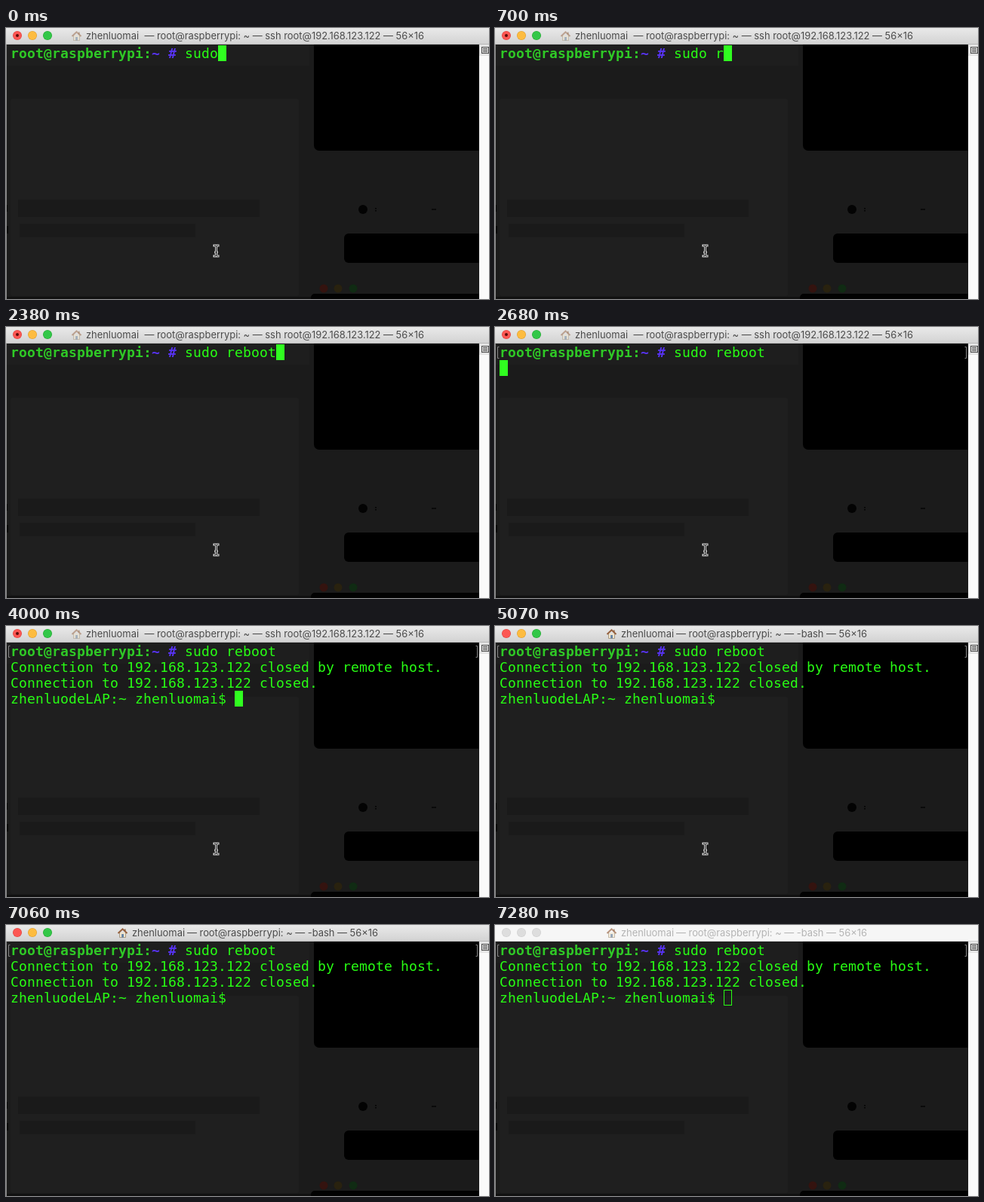
Write an HTML page with a canvas that moves like this. It is 640 by 360 pixels and loops after 7.32 s.

```html
<!DOCTYPE html>
<html lang="en">
<head>
<meta charset="utf-8">
<title>Terminal reboot</title>
<style>
html, body { margin: 0; width: 100%; height: 100%; overflow: hidden; background: #1c1c1c; }
canvas { display: block; width: 640px; height: 360px; }
</style>
</head>
<body>
<canvas id="stage"></canvas>
<script>
const LOOP = 7320, W = 640, H = 360;
const COL = 11, ROW = 21, LEFT = 6, TOP = 23;
const MONO = '18px "DejaVu Sans Mono", monospace';
const GREEN = '#28fe14', PROMPT = '#2fc926', BLUE = '#5833f4';
const USER = 'zhenluomai', HOST = 'zhenluodeLAP', IP = '192.168.123.122';

const ENTER = 2620, CLOSED = 4000, SHELL = 4060, LEAVE = 6480, INACTIVE = 7280;
const KEYS = [400, 700, 940, 1240, 1480, 1660, 2380];
const BLINKS = [5070, 5610, 6090, 6590, 7060];

const canvas = document.getElementById('stage');
const dpr = window.devicePixelRatio || 1;
canvas.width = W * dpr;
canvas.height = H * dpr;
const ctx = canvas.getContext('2d');
ctx.scale(dpr, dpr);

const countPast = (times, t) => times.filter(x => t >= x).length;

function rect(x, y, w, h, color) {
  ctx.fillStyle = color;
  ctx.fillRect(x, y, w, h);
}

function rounded(x, y, w, h, radii, color) {
  ctx.fillStyle = color;
  ctx.beginPath();
  ctx.roundRect(x, y, w, h, radii);
  ctx.fill();
}

function disc(x, y, r, color) {
  ctx.fillStyle = color;
  ctx.beginPath();
  ctx.arc(x, y, r, 0, Math.PI * 2);
  ctx.fill();
}

function line(color, width, ...points) {
  ctx.strokeStyle = color;
  ctx.lineWidth = width;
  ctx.beginPath();
  points.forEach(([x, y]) => ctx.lineTo(x, y));
  ctx.stroke();
}

// One glyph per grid cell
function print(text, col, row, color = GREEN, bold = false) {
  ctx.font = (bold ? 'bold ' : '') + MONO;
  ctx.textAlign = 'left';
  ctx.fillStyle = color;
  [...text].forEach((ch, i) =>
    ctx.fillText(ch, LEFT + (col + i) * COL, TOP + row * ROW + 17));
}

function block(col, row) {
  rect(LEFT + col * COL, TOP + row * ROW, COL, ROW, '#30fe20');
}

// Dim shapes showing through the translucent window
function backdrop() {
  rect(0, 22, W, H - 22, '#1b1b1b');
  rect(0, 22, 402, 28, '#1e1e1e');
  rounded(6, 94, 382, 262, 3, '#1f1f1f');
  rect(16, 228, 320, 23, '#1a1a1a');
  rect(18, 260, 233, 18, '#1a1a1a');
  rounded(408, 22, 219, 141, [0, 0, 0, 7], '#000');
  rounded(448, 273, 179, 39, [6, 0, 0, 6], '#000');
  rect(0, 357, 405, 3, '#111');
  rounded(404, 353, 223, 7, [5, 0, 0, 0], '#020202');
  rect(0, 235, 2, 9, '#050505');
  rect(0, 263, 3, 10, '#050505');
  disc(473, 241, 6, '#030303');
  rect(489, 239, 2, 1.5, '#050505');
  rect(489, 242, 2, 1.5, '#050505');
  line('#050505', 1.5, [564, 241], [570, 241]);
  disc(421, 346, 5.5, '#34130f');
  disc(440, 346, 5.5, '#29220f');
  disc(460, 346, 5.5, '#102b13');
  rect(0, 22, 1, H - 22, '#8c8c8c');
}

function scrollbar() {
  rect(627, 22, 13, H - 22, '#fafafa');
  rect(627, 22, 13, 15, '#e4e4e4');
  ctx.strokeStyle = '#4a4a4a';
  ctx.lineWidth = 1;
  ctx.strokeRect(630.5, 25.5, 9, 8);
  for (const y of [27.5, 29.5, 31.5]) line('#4a4a4a', 1, [632, y], [638, y]);
}

function house(x, alpha) {
  ctx.save();
  ctx.translate(x, 4);
  ctx.globalAlpha = alpha;
  rect(2.5, 6, 8, 6.5, '#eee3cc');
  line('#9c8b72', 0.8, [2.5, 6], [2.5, 12.5], [10.5, 12.5], [10.5, 6]);
  rect(5.2, 8, 2.7, 4.5, '#5f7fa5');
  rect(9, 1.5, 1.6, 3, '#8b6849');
  line('#96613f', 2, [0.5, 7], [6.5, 1.3], [12.5, 7]);
  ctx.restore();
}

function titleBar(t) {
  const active = t < INACTIVE, remote = t < SHELL;
  if (active) {
    const shade = ctx.createLinearGradient(0, 0, 0, 22);
    shade.addColorStop(0, '#e9e9e9');
    shade.addColorStop(1, '#d2d2d2');
    rect(0, 0, W, 22, shade);
    rect(0, 21, W, 1, '#b8b8b8');
  } else {
    rect(0, 0, W, 22, '#f6f6f6');
    rect(0, 21, W, 1, '#d4d4d4');
  }

  const lights = active
    ? [['#fc5753', '#df4744'], ['#fdbc40', '#de9f34'], ['#33c748', '#27aa35']]
    : Array(3).fill(['#dddddd', '#cfcfcf']);
  lights.forEach(([fill, edge], i) => {
    const x = 15 + i * 20;
    disc(x, 10, 6, edge);
    disc(x, 10, 5.4, fill);
  });
  if (remote) disc(15, 10, 2, '#5a0c0a');

  house(remote ? 87 : 148, remote ? 0.5 : active ? 1 : 0.65);
  ctx.font = '12.9px Inter, sans-serif';
  ctx.fillStyle = active ? '#4b4b4b' : '#b4b4b4';
  ctx.textAlign = 'left';
  ctx.fillText(USER, remote ? 106 : 167, 15);
  ctx.textAlign = 'right';
  const job = remote ? `ssh root@${IP}` : '-bash';
  ctx.fillText(`— root@raspberrypi: ~ — ${job} — 56×16`, remote ? 554 : 493, 15);
}

function brackets() {
  for (const [x, d] of [[3.5, 2], [624.5, -2]])
    line('#858585', 1, [x + d, 26.5], [x, 26.5], [x, 41.5], [x + d, 41.5]);
}

function terminal(t) {
  print('root@raspberrypi:', 0, 0, PROMPT, true);
  print('~ #', 17, 0, BLUE, true);
  const typed = 'sudo reboot'.slice(0, 4 + countPast(KEYS, t));
  print(typed, 21, 0);
  if (t < ENTER) {
    block(21 + typed.length, 0);
    return;
  }
  brackets();
  if (t < CLOSED) {
    block(0, 1);
    return;
  }
  print(`Connection to ${IP} closed by remote host.`, 0, 1);
  print(`Connection to ${IP} closed.`, 0, 2);
  const prompt = `${HOST}:~ ${USER}$ `;
  print(prompt, 0, 3);
  if (t >= INACTIVE) {
    ctx.strokeStyle = GREEN;
    ctx.lineWidth = 1;
    ctx.strokeRect(LEFT + prompt.length * COL + 0.5, TOP + 3 * ROW + 0.5, COL - 1, ROW - 1);
  } else if (countPast(BLINKS, t) % 2 === 0) {
    block(prompt.length, 3);
  }
}

function pointer(t) {
  if (t >= 6590) return;
  const step = countPast([LEAVE, 6540], t);
  ctx.save();
  ctx.translate(278.5 + step * 42, 296 - step * 95);
  ctx.lineCap = 'square';
  for (const [color, width] of [['#d8d8d8', 3], ['#161616', 1]]) {
    line(color, width, [0, -6], [0, 6]);
    for (const s of [-1, 1])
      line(color, width, [-2.5, 7 * s], [-1, 7 * s], [0, 6 * s], [1, 7 * s], [2.5, 7 * s]);
    line(color, width, [-0.8, 2], [0.8, 2]);
  }
  ctx.restore();
}

function draw(now) {
  const t = now % LOOP;
  backdrop();
  terminal(t);
  scrollbar();
  titleBar(t);
  pointer(t);
}

const start = performance.now();
function tick() {
  draw(performance.now() - start);
  requestAnimationFrame(tick);
}
tick();
</script>
</body>
</html>
```
